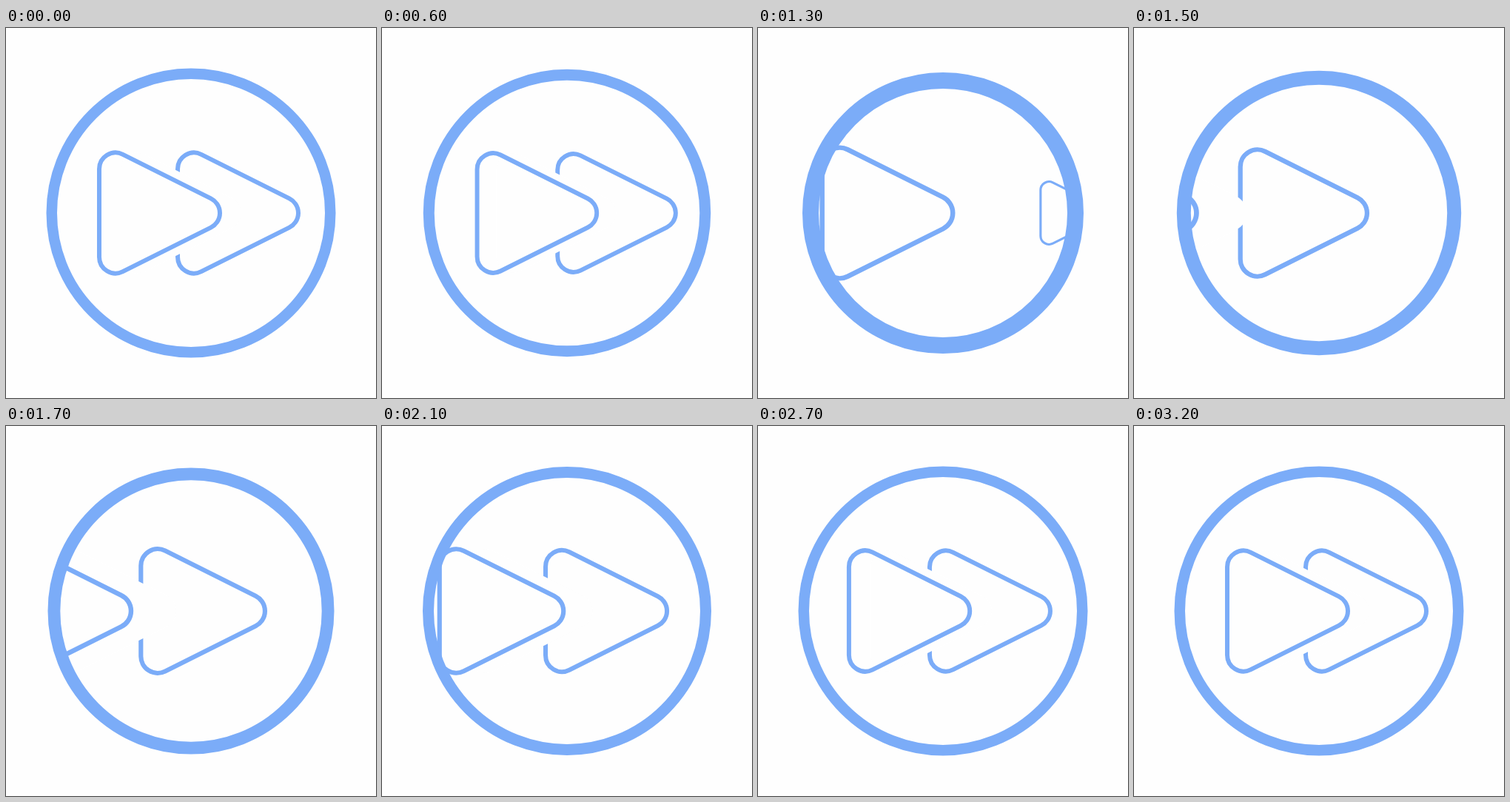
Write an HTML page with a canvas that moves like this. It is 500 px wide and 500 px high and loops after 3.7 s.

```html
<!DOCTYPE html>
<html lang="en">
<head>
<meta charset="utf-8">
<title>Fast forward</title>
<style>
  html, body { margin: 0; width: 100%; height: 100%; overflow: hidden; background: #fefefe; }
  canvas { display: block; width: 500px; height: 500px; }
</style>
</head>
<body>
<canvas id="stage" width="500" height="500"></canvas>
<script>
const ctx = document.getElementById('stage').getContext('2d');
const BLUE = '#7bacf8', PAPER = '#fefefe';
const LOOP = 3700, STEP = 100, START = 0.55, MID = 250;

// home: resting centre; push, shrink: exit strength; swap: when the next one enters
const front = { home: 207.5, push: 359, shrink: 0.739, swap: 1.4, end: 3.1, pull: 46, power: 3 };
const back = { home: 313.5, push: 681, shrink: 1.835, swap: 1, end: 2.9, pull: 24, power: 3.73 };

// seconds, outer radius, line width
const ringKeys = [
  [0.5, 195.5, 14.5], [0.7, 193, 15.5], [0.9, 184.5, 19.5],
  [1.1, 186.5, 22.5], [1.3, 190, 22], [1.5, 192.2, 19],
  [1.7, 193.5, 16.8], [2.1, 195, 15], [2.5, 195.5, 14.5]
];

function ringAt(t) {
  const next = ringKeys.findIndex(k => k[0] > t);
  if (next < 1) return ringKeys[0].slice(1);
  const a = ringKeys[next - 1], b = ringKeys[next];
  const p = (t - a[0]) / (b[0] - a[0]);
  return [1, 2].map(i => a[i] + (b[i] - a[i]) * p);
}

function pose(part, t) {
  if (t < part.swap) {
    const u = Math.max(0, t - START);
    return {
      x: part.home + part.push * u ** 1.754,
      scale: Math.max(0, 1 - part.shrink * u ** 1.5),
      entering: false
    };
  }
  const left = Math.max(0, part.end - t);
  const lead = Math.max(0, 1 - (t - part.swap) / 0.3);
  const gap = part.pull * left ** part.power + 60 * lead ** 2;
  return { x: part.home - gap, scale: 1 + 0.0006 * gap, entering: true };
}

// How far the blank area reaches past the front arrow
function reach(a, b, t) {
  if (a.entering !== b.entering) return 0;
  if (!a.entering) return 29 * Math.max(0, 1 - 2 * Math.max(0, t - START));
  const spread = Math.min(90, Math.max(0, b.x - a.x - 106));
  return 29 + 0.2 * spread + 0.0026 * spread ** 2;
}

function arrow({ x, scale }, fill) {
  ctx.save();
  ctx.translate(x, MID);
  ctx.scale(scale, scale);
  ctx.beginPath();
  ctx.moveTo(-81.5, 0);
  ctx.arcTo(-81.5, -95.1, 108.7, 0, 22);
  ctx.arcTo(108.7, 0, -81.5, 95.1, 22);
  ctx.arcTo(-81.5, 95.1, -81.5, 0, 22);
  ctx.closePath();
  if (fill) {
    ctx.fillStyle = PAPER;
    ctx.fill();
  } else {
    ctx.lineWidth = 6;
    ctx.stroke();
  }
  ctx.restore();
}

function disc(radius) {
  ctx.beginPath();
  ctx.arc(MID, MID, radius, 0, Math.PI * 2);
}

function draw(t) {
  const [radius, width] = ringAt(t);
  const a = pose(front, t), b = pose(back, t);
  const offset = reach(a, b, t);

  ctx.fillStyle = PAPER;
  ctx.fillRect(0, 0, 500, 500);
  ctx.strokeStyle = BLUE;

  ctx.save();
  disc(radius - 3);
  ctx.clip();
  arrow(b);
  if (offset) arrow({ x: a.x + offset, scale: a.scale }, true);
  arrow(a);
  ctx.restore();

  disc(radius - width / 2);
  ctx.lineWidth = width;
  ctx.stroke();
}

const began = performance.now();
function tick() {
  const ms = (performance.now() - began) % LOOP;
  draw(Math.floor(ms / STEP) * STEP / 1000);
  requestAnimationFrame(tick);
}
tick();
</script>
</body>
</html>
```
